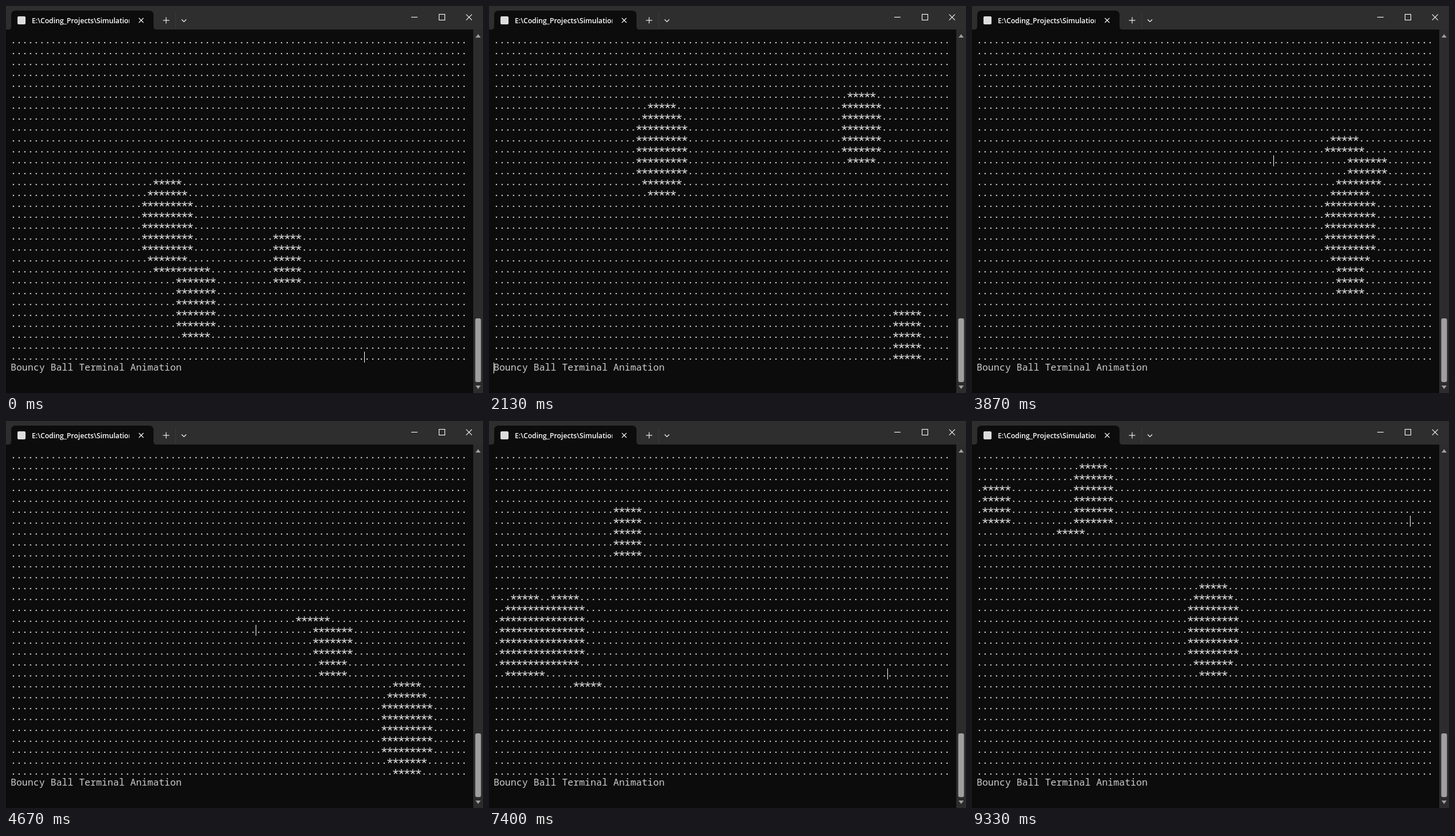
Recreate the animation shown at these times as an HTML page with a canvas. Size 831 px wide and 674 px high, loop 9400 ms.

```html
<!DOCTYPE html>
<html lang="en">
<head>
<meta charset="utf-8">
<title>Bouncy Ball Terminal Animation</title>
<style>
html, body { margin: 0; width: 100%; height: 100%; overflow: hidden; background: #0c0c0c; }
canvas { display: block; }
</style>
</head>
<body>
<canvas id="stage" width="831" height="674"></canvas>
<script>
const ctx = document.getElementById('stage').getContext('2d');

const COLS = 80, ROWS = 30, CELLS = COLS * ROWS;
const LEFT = 8, TOP = 50, CELL_W = 9.9375, CELL_H = 19, BASELINE = 15;
const LOOP = 9400, TICKS_PER_MS = 0.015;
const DRAW_SHARE = 0.6; // part of each cycle spent printing, the rest is a pause
const INK = '#cccccc';

// Printing progress: [tick, picture, row, column]
const PACE = [
  [0, 0, 29, 62], [20, 5, 19, 69], [32, 8, 30, 0], [46, 12, 6, 61], [70, 18, 16, 43],
  [75, 19, 30, 0], [90, 23, 4, 65], [111, 28, 20, 69], [140, 35, 6, 76]
].map(([tick, n, row, col]) => [tick, n + DRAW_SHARE * (row * COLS + col) / CELLS]);

function bounce(ball, pos, vel, size) {
  const min = ball.r + 1, max = size - 1 - ball.r;
  ball[pos] += ball[vel];
  if (ball[pos] < min || ball[pos] > max) {
    ball[pos] = Math.min(max, Math.max(min, ball[pos]));
    ball[vel] *= -1;
  }
}

function simulate(count) {
  const balls = [
    { x: 27, y: 17, vx: -6, vy: 3, r: 4 },
    { x: 32, y: 24, vx: 4, vy: -2, r: 3 },
    { x: 48, y: 20, vx: 3, vy: 1, r: 2 }
  ];
  const states = [];
  for (let i = 0; i < count; i++) {
    states.push(balls.map(b => ({ ...b })));
    for (const b of balls) {
      bounce(b, 'x', 'vx', COLS);
      bounce(b, 'y', 'vy', ROWS);
    }
  }
  return states;
}
const states = simulate(40);

const covered = (balls, col, row) =>
  balls.some(b => (col - b.x) ** 2 + (row - b.y) ** 2 <= b.r * b.r + 4);

function progress(tick) {
  let i = 1;
  while (i < PACE.length - 1 && tick > PACE[i][0]) i++;
  const [t0, p0] = PACE[i - 1], [t1, p1] = PACE[i];
  return p0 + (p1 - p0) * (tick - t0) / (t1 - t0);
}

function line(color, width, ...points) {
  ctx.strokeStyle = color;
  ctx.lineWidth = width;
  ctx.beginPath();
  points.forEach(([x, y], i) => i ? ctx.lineTo(x, y) : ctx.moveTo(x, y));
  ctx.stroke();
}

function shape(color, build) {
  ctx.fillStyle = color;
  ctx.beginPath();
  build();
  ctx.fill();
}

function cross(x, y, s) {
  line('#fff', 1.1, [x - s, y - s], [x + s, y + s]);
  line('#fff', 1.1, [x - s, y + s], [x + s, y - s]);
}

function triangle(x, y, s) {
  shape('#9f9f9f', () => {
    ctx.moveTo(x, y - 3 * s);
    ctx.lineTo(x + 4.5, y + 3 * s);
    ctx.lineTo(x - 4.5, y + 3 * s);
  });
}

function drawWindow() {
  ctx.fillStyle = '#0c0c0c';
  ctx.fillRect(0, 0, 831, 674);
  ctx.fillStyle = '#2e2e2e';
  ctx.fillRect(0, 0, 831, 41);

  shape('#0c0c0c', () => {
    ctx.moveTo(4, 41);
    ctx.quadraticCurveTo(9, 41, 9, 36);
    ctx.lineTo(9, 16);
    ctx.quadraticCurveTo(9, 8, 17, 8);
    ctx.lineTo(249, 8);
    ctx.quadraticCurveTo(257, 8, 257, 16);
    ctx.lineTo(257, 36);
    ctx.quadraticCurveTo(257, 41, 262, 41);
  });
  shape('#dddddd', () => ctx.roundRect(20, 18, 14, 14, 2));

  ctx.save();
  ctx.beginPath();
  ctx.rect(44, 10, 171, 30);
  ctx.clip();
  ctx.fillStyle = '#fff';
  ctx.font = '600 12.2px "Open Sans", "Noto Sans", sans-serif';
  ctx.fillText('E:\\Coding_Projects\\Simulation', 45, 29.5);
  ctx.restore();

  cross(235.5, 25, 4);
  line('#fff', 1.1, [273.5, 25], [284.5, 25]);
  line('#fff', 1.1, [279, 19.5], [279, 30.5]);
  line('#3b3b3b', 1, [295.5, 11], [295.5, 39]);
  line('#fff', 1.1, [306, 23.5], [310, 27.5], [314, 23.5]);
  line('#fff', 1.1, [706, 19.5], [717, 19.5]);
  ctx.strokeRect(754.5, 14.5, 10, 10);
  cross(806.7, 19.7, 5);

  ctx.fillStyle = '#2c2c2c';
  ctx.fillRect(814, 41, 17, 633);
  shape('#9f9f9f', () => ctx.roundRect(817.5, 544, 10, 111, 3));
  triangle(822.5, 52, 1);
  triangle(822.5, 664, -1);
}

function addStar(x, y) {
  for (let arm = 0; arm < 5; arm++) {
    const a = arm * Math.PI * 0.4;
    ctx.moveTo(x, y);
    ctx.lineTo(x + 4.7 * Math.sin(a), y - 4.7 * Math.cos(a));
  }
}

function drawTerminal(tick) {
  const p = progress(tick), n = Math.floor(p);
  const done = Math.min(CELLS, Math.round((p - n) / DRAW_SHARE * CELLS));
  const fresh = states[n], stale = states[Math.max(0, n - 1)];

  ctx.fillStyle = ctx.strokeStyle = INK;
  ctx.lineWidth = 1.5;
  ctx.beginPath();
  for (let i = 0; i < CELLS; i++) {
    const col = i % COLS, row = Math.floor(i / COLS);
    const x = LEFT + (col + 0.5) * CELL_W;
    const base = TOP + row * CELL_H + BASELINE;
    if (covered(i < done ? fresh : stale, col, row)) addStar(x, base - 5);
    else ctx.fillRect(x - 1.1, base - 2.2, 2.2, 2.2);
  }
  ctx.stroke();

  ctx.font = '500 16.56px "Noto Sans Mono", "DejaVu Sans Mono", monospace';
  ctx.fillText('Bouncy Ball Terminal Animation', LEFT, TOP + ROWS * CELL_H + BASELINE);

  ctx.fillStyle = '#fff';
  ctx.fillRect(Math.round(LEFT + done % COLS * CELL_W),
    TOP + Math.floor(done / COLS) * CELL_H + 1, 1, CELL_H);
}

// Ticks run at 15 per second and begin on whole hundredths.
function tickAt(ms) {
  const k = Math.round(ms * TICKS_PER_MS);
  return Math.round(k / TICKS_PER_MS / 10) * 10 > ms ? k - 1 : k;
}

let start = null, shown = -1;
function render(now) {
  if (start === null) start = now;
  const tick = tickAt((now - start) % LOOP);
  if (tick !== shown) {
    shown = tick;
    drawWindow();
    drawTerminal(tick);
  }
  requestAnimationFrame(render);
}
requestAnimationFrame(render);
</script>
</body>
</html>
```
